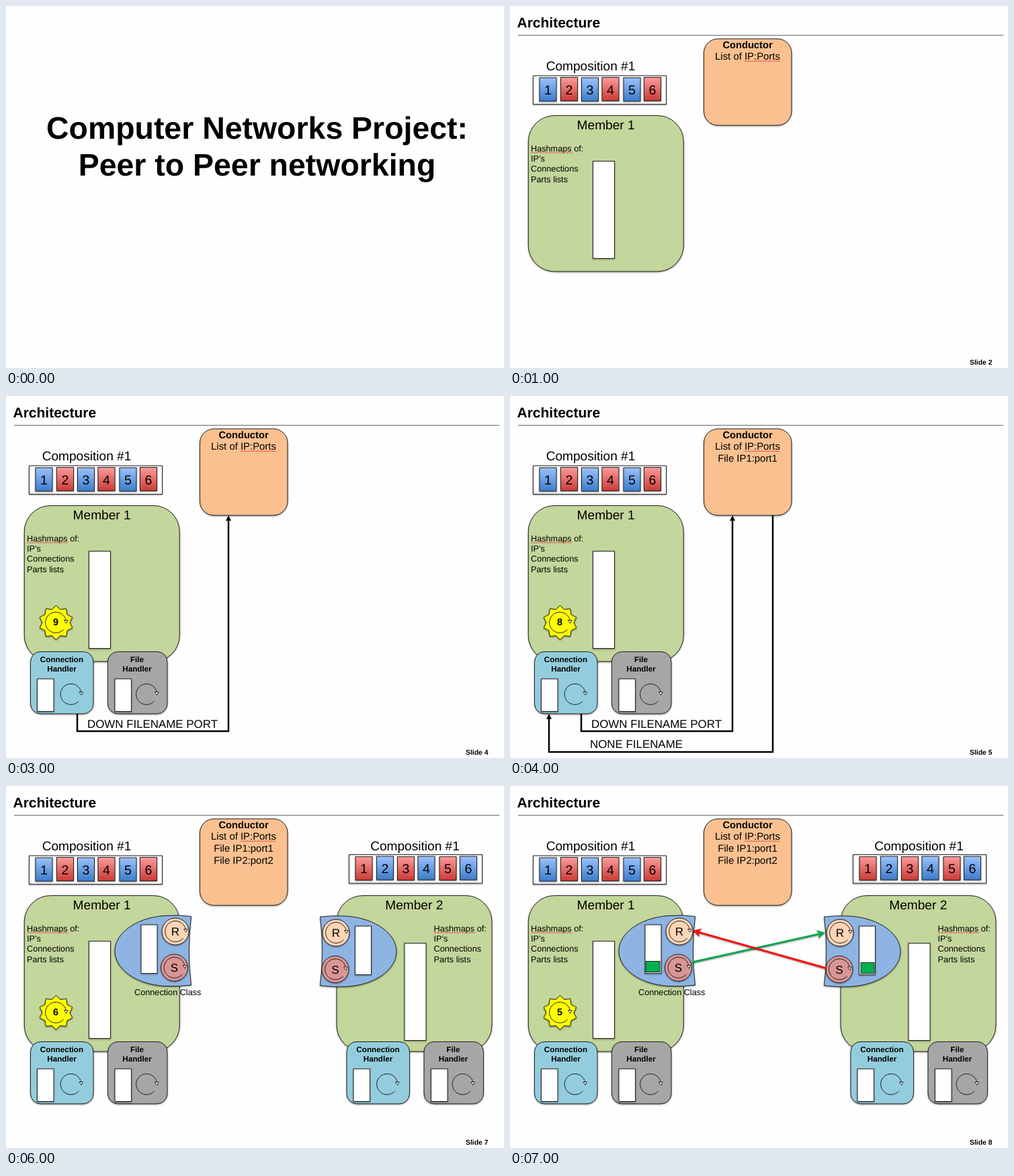
An HTML page that plays this animation: 741 by 540 pixels, repeating every 8000 ms.

```html
<!DOCTYPE html>
<html lang="en">
<head>
<meta charset="utf-8">
<title>Peer to Peer networking</title>
<style>
html, body { margin: 0; width: 100%; height: 100%; overflow: hidden; background: #fefefe; }
svg { display: block; width: 741px; height: 540px; }
text { font-family: "Liberation Sans", Arial, sans-serif; text-rendering: geometricPrecision; fill: #000; }
.b { font-weight: 700; }
.box { stroke: #222; stroke-width: 1; }
.shade { filter: drop-shadow(0 1.5px 1.2px rgba(0, 0, 0, .42)); }
.line { fill: none; stroke-width: 2.5; }
</style>
</head>
<body>
<svg id="stage" viewBox="0 0 741 540">
<defs>
<linearGradient id="blue" x2="0" y2="1"><stop stop-color="#9cc2fc"/><stop offset="1" stop-color="#3b7ccb"/></linearGradient>
<linearGradient id="red" x2="0" y2="1"><stop stop-color="#fc9c9b"/><stop offset="1" stop-color="#cb3a36"/></linearGradient>
</defs>
</svg>
<script>
const SLIDE_MS = 1000, SLIDES = 8;
const stage = document.getElementById('stage');

const text = (s, x, y, size, anchor = 'middle', cls = '') =>
  `<text x="${x}" y="${y}" font-size="${size}" text-anchor="${anchor}" class="${cls}">${s}</text>`;
const bold = (s, x, y, size, anchor) => text(s, x, y, size, anchor, 'b');
const left = (s, x, y, size) => text(s, x, y, size, 'start');
const box = (x, y, w, h, fill, r = 0, cls = 'shade') =>
  `<rect class="box ${cls}" x="${x}" y="${y}" width="${w}" height="${h}" rx="${r}" fill="${fill}"/>`;
const token = (x, y, w = 21) => box(x, y, w, 16, '#00b050', 0, '');
const show = (from, to, ...parts) => `<g data-from="${from}" data-to="${to}">${parts.join('')}</g>`;

function squiggle(x1, x2, y) {
  let d = `M${x1} ${y}`;
  for (let x = x1 + 1.5, up = true; x <= x2; x += 1.5, up = !up) d += `L${x} ${y - up}`;
  return `<path d="${d}" fill="none" stroke="#e8413a" stroke-width=".9"/>`;
}

// Loop arrow with a gap at the lower right
function spin(x, y, r) {
  const a = Math.PI / 4.4, sx = x + r * Math.cos(a), sy = y + r * Math.sin(a);
  return `<path d="M${sx} ${sy}A${r} ${r} 0 1 1 ${x + r} ${y - 2}" fill="none" stroke="#222"/>
    <path d="M${x + r - 3} ${y - 3.5}h5.4l-2.2 4.6z" fill="#fff" stroke="#111" stroke-width=".9"/>`;
}

function star(x, y, points, outer, inner) {
  const pts = Array.from({ length: points * 2 }, (_, i) => {
    const a = i * Math.PI / points - Math.PI / 2, r = i % 2 ? inner : outer;
    return `${(x + r * Math.cos(a)).toFixed(1)},${(y + r * Math.sin(a)).toFixed(1)}`;
  });
  return `<polygon class="box shade" points="${pts.join(' ')}" fill="#ff0"/>`;
}

// Right-angled connector ending in an upward arrowhead
function elbow(x1, y1, mid, x2, y2, color = '#000') {
  return `<path class="line" d="M${x1} ${y1}V${mid}H${x2}V${y2 + 5}" stroke="${color}"/>
    <path d="M${x2} ${y2}l4 8h-8z" fill="${color}"/>`;
}

function arrow(x1, y1, x2, y2, color) {
  const deg = Math.atan2(y2 - y1, x2 - x1) * 180 / Math.PI;
  const length = Math.hypot(x2 - x1, y2 - y1);
  return `<g class="shade"><g transform="translate(${x2} ${y2}) rotate(${deg})">
    <path d="M${-length} 0H-5" stroke="${color}" stroke-width="3"/>
    <path d="M1 0L-11 -6.5L-8 0L-11 6.5z" fill="${color}"/></g></g>`;
}

function composition(x, y, labelX, colors) {
  const cells = [9.5, 41, 72, 102.5, 134.5, 165].map((dx, i) =>
    box(x + dx, y + (i % 2 ? 2.5 : 3), 25, 35, `url(#${colors[i % 2]})`) +
    text(i + 1, x + dx + 12.5, y + 27.5, 19.5));
  return text('Composition #1', labelX, 95.5, 19.1) + box(x, y, 198, 42.5, '#fff') + cells.join('');
}

function member(n, x, listX, barX, barY) {
  const lines = ['Hashmaps of:', "IP’s", 'Connections', 'Parts lists'];
  return box(x, 163.5, 231, 232.5, '#c3d69b', 39) +
    text('Member ' + n, x + 115.3, 184, 19.1) +
    lines.map((s, i) => left(s, listX, 216.5 + i * 15.4, 12.7)).join('') +
    squiggle(listX, listX + 62, 219.3) +
    box(barX, barY, 32, 145, '#fff');
}

function handler(name, x, w, fill, textX, barX, spinX) {
  return box(x, 381.5, w, 92.5, fill, 15) +
    bold(name, textX, 397, 11.7) + bold('Handler', textX, 411, 11.7) +
    box(barX, 422, 24.5, 48.5, '#fff') + spin(spinX, 445, 15.5);
}

const handlers = dx => `<g transform="translate(${dx} 0)">` +
  handler('Connection', 36.5, 93.5, '#93cddd', 83, 46.5, 96.5) +
  handler('File', 151.5, 88.5, '#a6a6a6', 195, 162, 209) + '</g>';

const port = (s, x, y, fill) =>
  `<circle class="box shade" cx="${x}" cy="${y}" r="20" fill="${fill}"/>` +
  spin(x, y, 15.5) + text(s, x, y + 6, 17);

function link(shape, barX, barY, rx, ry, sx, sy) {
  return `<path class="box shade" fill="#8eb4e3" transform="${shape}" d="M275.5 194.5Q255 192 236 193.5C190 197 162 222 162 246C162 272 192 296 236 298.5Q256 299.5 275.5 297Q269 246 275.5 194.5Z"/>` +
    box(barX, barY, 24, 72.5, '#fff') +
    port('R', rx, ry, '#fcd5b5') + port('S', sx, sy, '#d99694');
}

const counts = [3, 4, 5, 6, 7, 8].map(n => show(n, n, bold(13 - n, 74, 342, 14.4)));
const numbers = [2, 3, 4, 5, 6, 7, 8].map(n => show(n, n, bold('Slide ' + n, 717.5, 535, 10.4, 'end')));

stage.insertAdjacentHTML('beforeend', [
  show(1, 1,
    bold('Computer Networks Project:', 373.5, 197.5, 46.45),
    bold('Peer to Peer networking', 373.5, 253.3, 46.45)),
  show(2, 8,
    bold('Architecture', 10.5, 31.5, 21, 'start'),
    '<path d="M12 43.8H734" stroke="#555"/>',
    composition(34.5, 104, 120, ['blue', 'red']),
    member(1, 27.3, 31, 123.5, 231.5),
    box(288.5, 49, 130.5, 129, '#fac090', 21),
    bold('Conductor', 353.5, 62.7, 14.7),
    text('List of IP:Ports', 353.5, 80.3, 14.9),
    squiggle(349, 402, 82.8)),
  show(5, 8, text('File IP1:port1', 353.5, 98, 14.9)),
  show(6, 8,
    text('File IP2:port2', 353.5, 115.8, 14.9),
    composition(510.5, 102.5, 608.5, ['red', 'blue']),
    member(2, 492, 636.5, 593, 234.5),
    handlers(470.5)),
  show(3, 8, handlers(0), star(74.5, 338, 10, 25.5, 20.5), spin(74, 338, 15.5), ...counts),
  show(3, 3, token(48, 452)),
  show(4, 5, elbow(106, 474, 500, 331, 178), left('DOWN FILENAME PORT', 121, 494.7, 16.9)),
  show(5, 5, elbow(391, 178, 531, 58, 474), left('NONE FILENAME', 119, 524.7, 16.9)),
  show(6, 6,
    elbow(535, 474, 481, 331, 178, '#a6a6a6'),
    elbow(391, 178, 506, 576, 474),
    left('SEND FILENAME 1', 396.5, 501.7, 16.9),
    left('IP1:port1', 396, 522.5, 16.9)),
  show(7, 8,
    link('', 201, 207, 252, 217, 250.5, 271),
    link('matrix(-1 0 0 1 743 .7)', 519.5, 209, 491, 219, 490, 273.5),
    left('Connection Class', 191, 312, 12.7)),
  show(8, 8,
    token(202, 261.5), token(522, 263.5, 20),
    arrow(271, 263, 468, 219, '#0aa64f'),
    arrow(471, 272, 273, 216, '#f80c0c')),
  ...numbers
].join(''));

const layers = [...stage.querySelectorAll('[data-from]')];
const start = performance.now();
let current = 0;

function draw() {
  const t = Math.max(0, performance.now() - start);
  const slide = Math.floor(t / SLIDE_MS) % SLIDES + 1;
  if (slide !== current) {
    current = slide;
    for (const g of layers) {
      g.style.display = slide >= +g.dataset.from && slide <= +g.dataset.to ? '' : 'none';
    }
  }
  requestAnimationFrame(draw);
}
draw();
</script>
</body>
</html>
```
